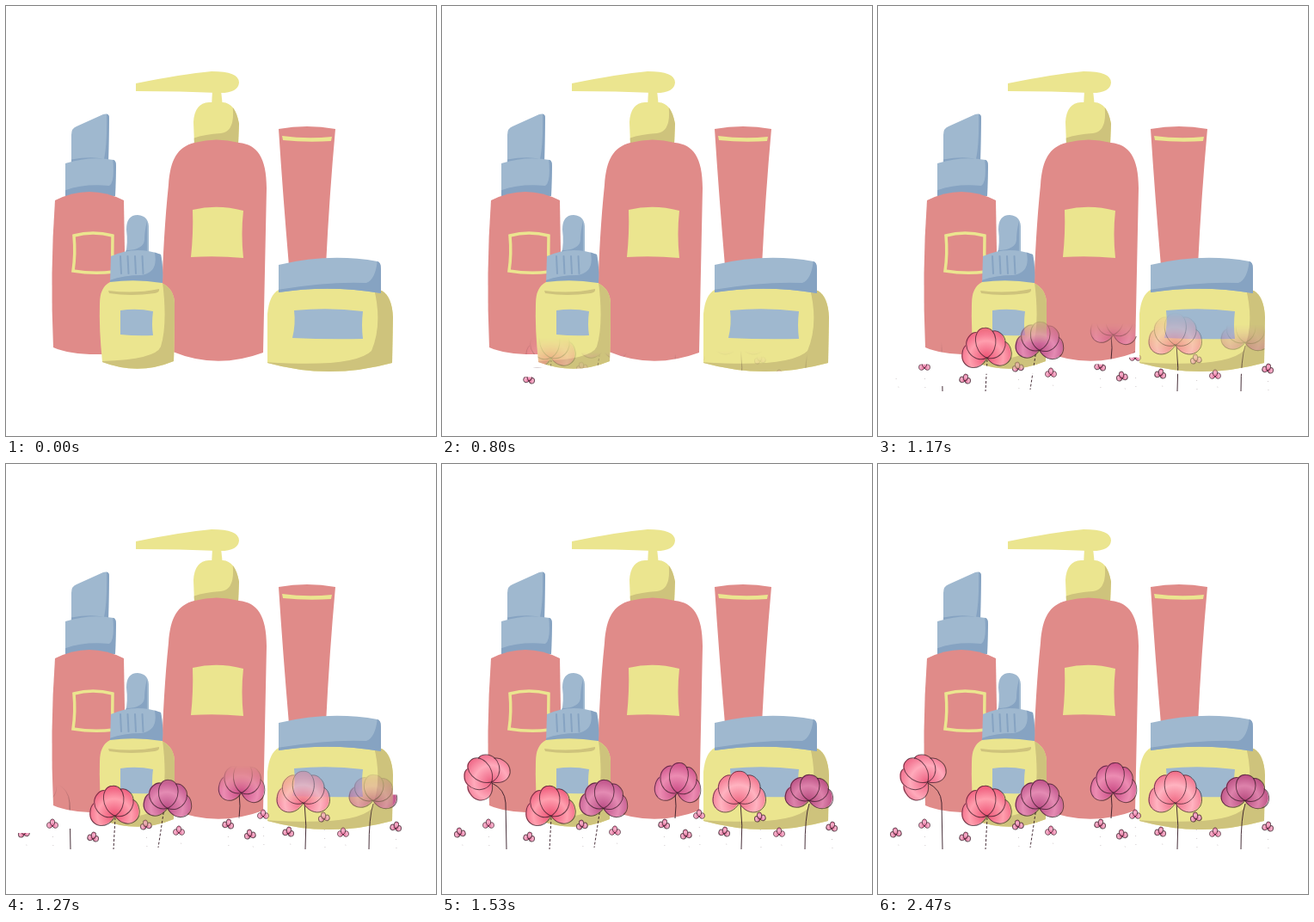
An HTML page with a canvas that plays this animation: 500 px wide and 500 px high, repeating every 5.01 s.

```html
<!DOCTYPE html>
<html lang="en">
<head>
<meta charset="utf-8">
<title>Bottles and flowers</title>
<style>
html, body { margin: 0; width: 100%; height: 100%; overflow: hidden; background: #fff; }
canvas { display: block; width: 100vmin; height: 100vmin; }
</style>
</head>
<body>
<canvas id="stage" width="500" height="500"></canvas>
<script>
const SIZE = 500, LOOP = 5010, START = 470, SPAN = 1060;
const RED = '#e08b89', YELLOW = '#ebe58f', OLIVE = '#cec37c', BLUE = '#9fb8cf', SLATE = '#86a3c2', INK = '#351a25';

const makeContext = () => {
  const canvas = document.createElement('canvas');
  canvas.width = canvas.height = SIZE;
  return canvas.getContext('2d');
};
const ctx = document.getElementById('stage').getContext('2d');
const still = makeContext(), scene = makeContext(), layer = makeContext();

const fill = (color, d) => {
  still.fillStyle = color;
  still.fill(new Path2D(d));
};
const line = (color, width, d) => {
  still.strokeStyle = color;
  still.lineWidth = width;
  still.stroke(new Path2D(d));
};
// Fills a shape, then paints a shadow kept inside it.
const shaded = (color, shadow, d, shadowPath) => {
  fill(color, d);
  still.save();
  still.clip(new Path2D(d));
  fill(shadow, shadowPath);
  still.restore();
};

function drawBottles() {
  still.lineCap = 'round';

  // Spray bottle
  shaded(BLUE, SLATE, 'M76 150Q76 142 82 140L113 126Q120 124 120 130L119 182Q98 178 76 184Z',
    'M117 120H122V186H74V179Q98 174 114 178Q118 160 117 120Z');
  shaded(BLUE, SLATE, 'M69 183Q98 174 125 179Q128 180 128 186L127 221H69Z',
    'M124 176H130V224H67V215Q90 206 120 209Q127 205 124 176Z');
  fill(RED, 'M57 226Q97 206 137 226L140 400L112 405Q76 406 55 397Q51 310 57 226Z');
  line(YELLOW, 3.5, 'M79 267Q101 261 124 267Q123 288 125 309Q102 312 78 308Q81 288 79 267Z');

  // Tube
  fill(RED, 'M317 143Q350 137 383 143Q376 220 372 302H329Q322 220 317 143Z');
  fill(YELLOW, 'M321 151Q350 155 379 152L378 157Q350 159 322 156Z');

  // Pump bottle
  fill(YELLOW, 'M151 90Q205 79 239 76Q271 76 271 89Q270 102 246 101Q205 99 151 99Z');
  fill(YELLOW, 'M240 98H250L252 117H239Z');
  shaded(YELLOW, OLIVE, 'M219 161L218 135Q219 113 236 112H252Q267 113 271 137L270 161Z',
    'M263 112Q268 146 250 148Q231 149 217 154V163H273V112Z');
  fill(RED, 'M219 159Q245 152 271 159C292 161 303 176 303 212L299 403Q245 423 194 402L181 340Q183 265 189 208C191 179 199 164 219 159Z');
  fill(YELLOW, 'M217 237Q246 230 276 238Q273 265 276 293Q245 290 215 292Q218 264 217 237Z');

  // Dropper
  shaded(BLUE, SLATE, 'M139 288Q142 276 140 260Q140 243 153 243Q167 244 166 260V290Z',
    'M164 250V292H138V284Q160 284 161 272Q161 262 164 250Z');
  shaded(BLUE, SLATE, 'M122 291Q151 278 180 289Q183 303 182 322H121Z',
    'M172 283Q179 310 157 313Q136 313 120 319V324H185V283Z');
  for (let x = 133; x < 160; x += 8.5) line(SLATE, 2, `M${x} 291L${x + 1} 311`);
  shaded(YELLOW, OLIVE, 'M121 321Q151 317 181 322Q196 329 196 347Q196 386 195 413Q154 430 112 414Q108 375 109 346Q109 327 121 321Z',
    'M182 321Q188 370 180 396Q174 411 112 413V430H200V321Z');
  fill(OLIVE, 'M119 331Q150 335 178 329Q179 333 173 334Q145 338 120 334Z');
  fill(BLUE, 'M133 354Q152 351 171 355Q169 370 171 383Q152 384 133 382Z');

  // Jar
  shaded(YELLOW, OLIVE, 'M317 330Q376 325 437 331Q449 338 450 362L449 415Q376 435 304 415V358Q306 336 317 330Z',
    'M428 329Q438 370 425 401Q405 421 302 414V434H453V329Z');
  shaded(BLUE, SLATE, 'M317 301Q376 287 432 297Q436 298 436 306V334Q376 324 317 333Z',
    'M432 294Q430 318 419 322Q375 320 315 330V337H438V294Z');
  fill(BLUE, 'M335 354Q376 350 415 355Q413 371 415 387Q374 388 333 386Q337 370 335 354Z');
}

// x, y: flower base; w, h: reach of petals; lead, soft, rise, power: reveal timing.
const flowers = [
  { x: 57, y: 370, w: 28, h: 35, rot: -0.78, hue: ['#ee6484', '#ffaabb'], stem: 'M58 371Q73 378 74 394L75 448', soft: 60, rise: 150, power: 5 },
  { x: 126, y: 409, w: 29, h: 35, rot: -0.08, hue: ['#ee5577', '#ff9fae'], stem: 'M127 411L125 448', lead: 300, soft: 70, broken: true },
  { x: 187, y: 400, w: 28, h: 33, rot: 0.05, hue: ['#bd5088', '#e48bb3'], stem: 'M184 400L177 446', lead: 90, soft: 30, broken: true },
  { x: 273, y: 382, w: 27, h: 35, rot: 0.08, hue: ['#cb4d86', '#ec8cb2'], stem: 'M271 382Q273 398 271 412', lead: 50, soft: 30 },
  { x: 345, y: 394, w: 31, h: 37, rot: 0, hue: ['#f06b86', '#ffb3c0'], stem: 'M347 393Q350 420 348 448', lead: 120, soft: 60 },
  { x: 426, y: 391, w: 28, h: 30, rot: 0.05, hue: ['#b94d81', '#dd82ab'], stem: 'M427 395Q422 410 422 448', lead: 40 }
].map(f => ({ ...f, count: 5 }));

const buds = [
  [21, 428, -290], [54, 418, -60], [101, 433, 150], [163, 419, -60], [201, 426, -60],
  [258, 418, -60], [284, 430, -60], [299, 407], [328, 427], [370, 410], [392, 428, -60], [453, 421, 150]
].map(([x, y, lead], i) => ({
  x, y: y + 3, lead, w: 6.5, h: 8, rot: (i % 3 - 1) * 0.2, count: 3, hue: ['#e8729f', '#f7b4cd'],
  stem: `M${x} ${y + 5}L${x + (i % 2 ? 1 : 4)} 447`, bud: true
}));
const plants = [...buds, ...flowers];

function drawStem(c, { stem, bud, broken }) {
  c.save();
  c.strokeStyle = INK;
  c.lineWidth = bud ? 0.6 : 1;
  c.globalAlpha = bud ? 0.4 : 0.9;
  if (bud) c.setLineDash([1, 9]);
  if (broken) c.setLineDash([3, 2]);
  c.stroke(new Path2D(stem));
  c.restore();
}

// Teardrop from the base, in units of the flower's reach.
function petalPath(angle, w, h) {
  const petal = new Path2D('M0 0C-.58 -.25 -.5 -1.02 0 -1C.5 -1.02 .58 -.25 0 0Z');
  const path = new Path2D();
  path.addPath(petal, new DOMMatrix().scale(w, h).rotate(angle * 180 / Math.PI));
  return path;
}

function drawHead(c, { x, y, w, h, rot, count, hue, bud }) {
  const middle = (count - 1) / 2, step = 1.36 / middle;
  const petals = [...Array(count).keys()]
    .sort((a, b) => Math.abs(b - middle) - Math.abs(a - middle))
    .map(i => petalPath((i - middle) * step, w, h));
  const wash = c.createRadialGradient(0, 0, 1, 0, 0, h);
  wash.addColorStop(0, hue[0]);
  wash.addColorStop(0.55, hue[1]);
  wash.addColorStop(1, hue[0]);

  c.save();
  c.translate(x, y);
  c.rotate(rot);
  c.strokeStyle = INK;
  c.lineWidth = 1;
  for (const petal of petals) {
    c.fillStyle = wash;
    c.fill(petal);
    c.save();
    c.globalAlpha = 0.7;
    if (!bud) c.translate(0.8, 0.3);
    c.stroke(petal);
    c.restore();
  }
  c.restore();
}

// Draws only the part below the given height.
function below(y, draw) {
  if (y >= SIZE) return;
  ctx.save();
  ctx.beginPath();
  ctx.rect(0, y, SIZE, SIZE - y);
  ctx.clip();
  draw();
  ctx.restore();
}

const edgeAt = (t, rise, power) => 410 - rise * Math.max(0, (t - START) / SPAN) ** power;

function grow(plant, t) {
  const { lead = 0, soft = 64, rise = 115, power = 3 } = plant;
  const edge = edgeAt(t + lead, rise, power);

  // On the empty ground the reveal has a hard edge.
  below(edgeAt(t, rise, power) + 51, () => drawStem(ctx, plant));
  below(edge + soft / 2, () => drawHead(ctx, plant));

  // Over the bottles it is soft.
  layer.globalCompositeOperation = 'source-over';
  layer.clearRect(0, 0, SIZE, SIZE);
  drawStem(layer, plant);
  drawHead(layer, plant);
  const mask = layer.createLinearGradient(0, edge, 0, edge + soft);
  mask.addColorStop(0, 'rgba(0,0,0,0)');
  mask.addColorStop(1, '#000');
  layer.globalCompositeOperation = 'destination-in';
  layer.fillStyle = mask;
  layer.fillRect(0, 0, SIZE, SIZE);
  scene.drawImage(layer.canvas, 0, 0);
}

function render(t) {
  ctx.fillStyle = '#fff';
  ctx.fillRect(0, 0, SIZE, SIZE);
  scene.globalCompositeOperation = 'copy';
  scene.drawImage(still.canvas, 0, 0);
  scene.globalCompositeOperation = 'source-atop';
  if (t >= START) plants.forEach(plant => grow(plant, Math.min(t, 2470)));
  ctx.drawImage(scene.canvas, 0, 0);
}

drawBottles();
const origin = performance.now();
function tick() {
  render((performance.now() - origin) % LOOP);
  requestAnimationFrame(tick);
}
tick();
</script>
</body>
</html>
```
